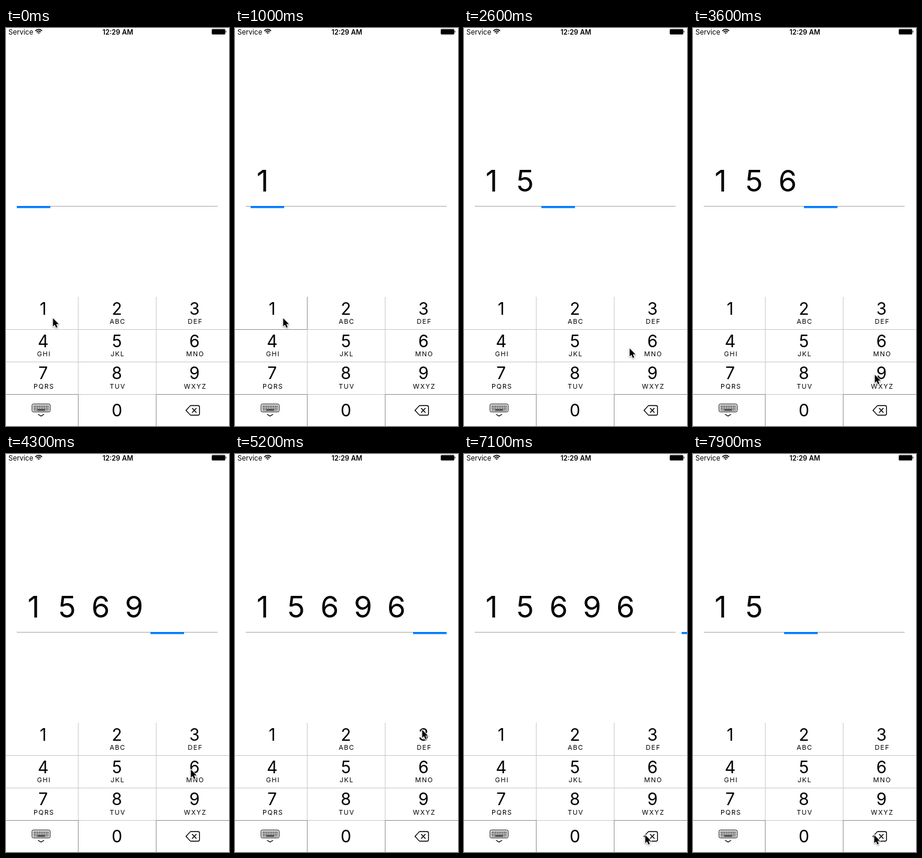
Recreate the animation shown at these times as an HTML page with a canvas. Size 372 by 662 pixels, loop 8 s.

```html
<!DOCTYPE html>
<html lang="en">
<head>
<meta charset="utf-8">
<title>PIN entry</title>
<style>
  html, body { margin: 0; width: 100%; height: 100%; overflow: hidden; background: #fff; }
  canvas { display: block; width: 372px; height: 662px; }
</style>
</head>
<body>
<canvas id="stage" width="372" height="662"></canvas>
<script>
const ctx = document.getElementById('stage').getContext('2d');
const W = 372, H = 662;
const LOOP = 8000, STEP = 100, SLIDE = 240, LEAD = 60, TRAVEL = 600;
const LIGHT = '#c9c9c9', DARK = '#8f8f8f';
const FONT = 'Inter, Roboto, sans-serif';

const LEFT = 18, LINE = 335, PITCH = LINE / 6, HIDDEN = W + 4;
const COLS = [0, 120, 250, W], TOP = 447, ROW = 54, TEXT_ROW = 53.6;
const LETTERS = ['', 'ABC', 'DEF', 'GHI', 'JKL', 'MNO', 'PQRS', 'TUV', 'WXYZ'];

const CODE = '156963';
const TYPED = [1000, 2100, 3000, 3800, 4600, 5600];
const ERASED = [7100, 7500, 7653, 7806];
const INPUTS = [
  ...TYPED.map((t, i) => ({ t: t - LEAD, count: i + 1, key: +CODE[i] })),
  ...ERASED.map((t, i) => ({ t: t - LEAD, count: CODE.length - 1 - i, key: 0 }))
];

// Pointer stops: arrival time and tip position
const STOPS = [
  [100, 81, 482], [1600, 165, 509], [2800, 291, 535], [3600, 304, 576],
  [4300, 309, 524], [5300, 313, 456], [6800, 303, 633]
];

const clamp = v => Math.max(0, Math.min(1, v));
const ease = p => p * p * (3 - 2 * p);
const easeOut = p => p * (2 - p);
const mix = (a, b, p) => a + (b - a) * p;
const colCenter = c => [62, 185, 314.5][c];

function rect(x, y, w, h, color) {
  ctx.fillStyle = color;
  ctx.fillRect(x, y, w, h);
}

function text(str, x, y, size, weight = 400, align = 'center', spacing = 0) {
  ctx.font = `${weight} ${size}px ${FONT}`;
  ctx.letterSpacing = spacing + 'px';
  ctx.textAlign = align;
  ctx.fillStyle = '#000';
  ctx.fillText(str, x, y);
}

function line(points, width, close) {
  ctx.beginPath();
  points.forEach(([x, y]) => ctx.lineTo(x, y));
  if (close) ctx.closePath();
  ctx.lineWidth = width;
  ctx.stroke();
}

// Each slide starts from wherever the bar is at that moment.
function entryAt(now) {
  let from = LEFT, to = LEFT, start = -SLIDE, count = 0, key = 0;
  const pos = t => mix(from, to, ease(clamp((t - start) / SLIDE)));
  for (const input of INPUTS) {
    if (input.t > now) break;
    from = pos(input.t);
    start = input.t;
    count = input.count;
    to = count < CODE.length ? LEFT + count * PITCH : HIDDEN;
    key = now - start < STEP ? input.key : 0;
  }
  return { bar: pos(now), count, key };
}

function pointerAt(now) {
  let x = 79, y = 482;
  for (const [end, tx, ty] of STOPS) {
    const p = easeOut(clamp((now - end + TRAVEL) / TRAVEL));
    // The very first nudge is a single jump.
    const q = end < TRAVEL ? +(now >= end) : p;
    x = mix(x, tx, q);
    y = mix(y, ty, q);
  }
  return [x, y];
}

function drawStatus() {
  text('Service', 4, 10.5, 11.6, 400, 'left');
  text('12:29 AM', 186.5, 10.5, 11.3, 600);
  const a = -Math.PI * 0.76, b = -Math.PI * 0.24;
  ctx.strokeStyle = '#000';
  ctx.lineWidth = 1.7;
  for (const r of [1.7, 4.6, 7.6]) {
    ctx.beginPath();
    ctx.arc(54.5, 10, r, a, b);
    ctx.stroke();
  }
  ctx.fillStyle = '#444';
  ctx.beginPath();
  ctx.roundRect(343, 1.5, 23, 9.5, 2);
  ctx.fill();
  rect(344, 2.5, 21, 7.5, '#000');
  rect(366.4, 4.5, 1.2, 3, '#333');
}

function drawEntry({ bar, count }) {
  for (let i = 0; i < count; i++) {
    text(CODE[i], LEFT + (i + 0.5) * PITCH + 0.2, 271.6, 49.5);
  }
  rect(LEFT, 296, LINE, 1, '#a6a6a6');
  rect(Math.floor(bar), 296, 56, 3.5, '#007aff');
}

function outline(col, row) {
  const x = COLS[col], y = TOP + row * ROW, w = COLS[col + 1] - x;
  for (const edge of [x, x + w]) {
    if (edge > 0 && edge < W) rect(edge, y, 1, ROW, DARK);
  }
  for (const edge of [y, y + ROW]) {
    if (edge > TOP && edge < H) rect(x, edge, w, 1, DARK);
  }
}

function drawGrid(key) {
  for (let i = 1; i < 3; i++) rect(COLS[i], TOP, 1, H - TOP, LIGHT);
  for (let i = 1; i < 4; i++) rect(0, TOP + i * ROW, W, 1, LIGHT);
  outline(0, 3);
  outline(2, 3);
  if (key) outline((key - 1) % 3, Math.floor((key - 1) / 3));
}

function drawKeys() {
  LETTERS.forEach((letters, i) => {
    const x = colCenter(i % 3), y = Math.floor(i / 3) * TEXT_ROW;
    text(i + 1, x, 477 + y, 28);
    text(letters, x + 1.3, 492.3 + y, 11, 400, 'center', 1.3);
  });
  text('0', colCenter(1), 646, 28);
}

function drawKeyboardIcon() {
  ctx.strokeStyle = '#000';
  ctx.lineWidth = 1;
  ctx.beginPath();
  ctx.roundRect(43.5, 625.5, 30, 13, 2);
  ctx.stroke();
  for (let row = 0; row < 3; row++) {
    for (let i = 0; i < 9; i++) {
      rect(46 + i * 2.9, 628 + row * 3.2, 1.9, 1.9, '#000');
    }
  }
  rect(51.8, 634.4, 13.5, 1.9, '#000');
  line([[53.5, 642.5], [58.5, 645.5], [63.5, 642.5]], 1.4);
}

function drawDeleteIcon() {
  ctx.save();
  ctx.translate(311.5, 636);
  ctx.strokeStyle = '#000';
  ctx.lineWidth = 1.4;
  ctx.beginPath();
  ctx.moveTo(-11.2, 0);
  ctx.arcTo(-3.8, -8, 11.2, -8, 2);
  ctx.arcTo(11.2, -8, 11.2, 0, 2.6);
  ctx.arcTo(11.2, 8, -3.8, 8, 2.6);
  ctx.arcTo(-3.8, 8, -11.2, 0, 2);
  ctx.closePath();
  ctx.stroke();
  for (const s of [-1, 1]) line([[-1, -3.7 * s], [6.2, 3.7 * s]], 1.5);
  ctx.restore();
}

function drawPointer([x, y]) {
  ctx.save();
  ctx.translate(x - 0.6, y + 0.8);
  const shape = [[0, 0], [0, 13.4], [3, 10.6], [5.2, 15.8], [7.5, 14.8], [5.3, 9.8], [9.6, 9.8]];
  ctx.lineJoin = 'round';
  ctx.strokeStyle = '#fff';
  ctx.shadowColor = 'rgba(0,0,0,0.4)';
  ctx.shadowBlur = 2.5;
  ctx.shadowOffsetY = 1;
  line(shape, 2, true);
  ctx.shadowColor = 'transparent';
  ctx.fillStyle = '#000';
  ctx.fill();
  ctx.restore();
}

function draw(t) {
  const entry = entryAt(t);
  rect(0, 0, W, H, '#fff');
  drawStatus();
  drawEntry(entry);
  drawGrid(entry.key);
  drawKeys();
  drawKeyboardIcon();
  drawDeleteIcon();
  drawPointer(pointerAt(t));
}

const begin = performance.now();
function tick() {
  const t = (performance.now() - begin) % LOOP;
  draw(Math.floor(t / STEP) * STEP);
  requestAnimationFrame(tick);
}
tick();
</script>
</body>
</html>
```
